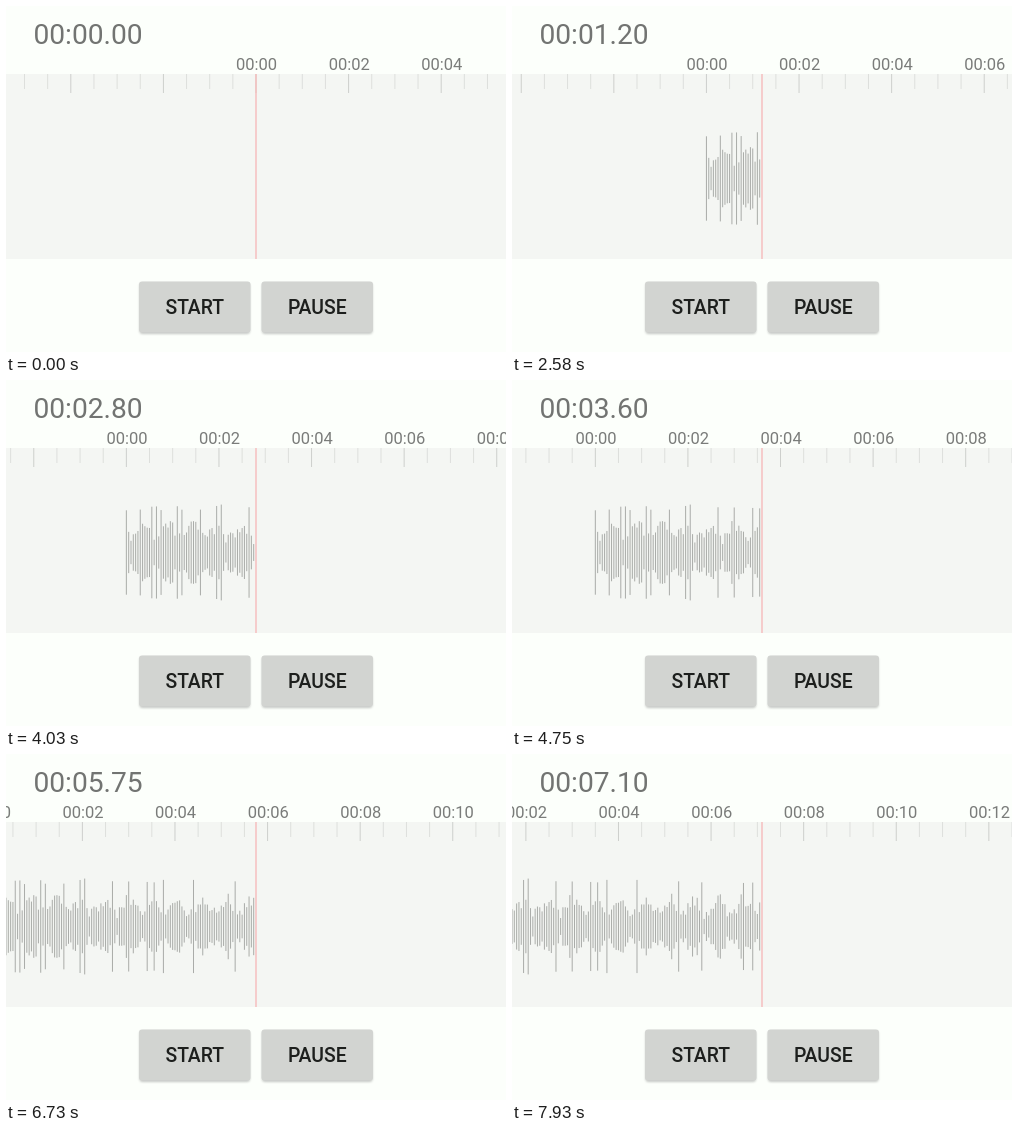
An HTML page that plays this animation: 500 px wide and 346 px high, repeating every 7990 ms.

```html
<!DOCTYPE html>
<html lang="en">
<head>
<meta charset="utf-8">
<title>Audio recorder</title>
<style>
  html, body { margin: 0; width: 100%; height: 100%; overflow: hidden; background: #fcfffb; }
  svg { display: block; width: 100%; height: 100%; font-family: Roboto, sans-serif; }
  #labels { font-size: 16.5px; fill: #7a7c7a; text-anchor: middle; }
  #buttons { font-size: 19.4px; font-weight: 500; fill: #1d1f1d; text-anchor: middle; }
</style>
</head>
<body>
<svg viewBox="0 0 500 346">
  <defs>
    <filter id="soft" x="-10%" y="-20%" width="120%" height="140%">
      <feGaussianBlur stdDeviation="1.3"/>
    </filter>
    <clipPath id="startShape"><rect x="133" y="275.5" width="111.5" height="51" rx="3"/></clipPath>
  </defs>
  <rect width="500" height="346" fill="#fcfffb"/>
  <text id="clock" x="27.4" y="38" font-size="28.2" fill="#727472"></text>
  <rect y="68" width="500" height="185" fill="#f4f6f3"/>
  <path id="minor" stroke="#dddfdc"/>
  <path id="major" stroke="#cdcfcc"/>
  <g id="labels"></g>
  <path id="wave" stroke="#a6a8a5" stroke-width=".95"/>
  <path d="M250 68V253" stroke="#f5bbba" stroke-width="1.4"/>
  <g id="buttons">
    <g fill="#000" filter="url(#soft)">
      <rect id="startShadow" x="133.5" y="277" width="110.5" height="51" rx="3" opacity=".22"/>
      <rect x="256" y="277" width="110.5" height="51" rx="3" opacity=".22"/>
    </g>
    <g fill="#d2d4d1">
      <rect x="133" y="275.5" width="111.5" height="51" rx="3"/>
      <rect x="255.5" y="275.5" width="111.5" height="51" rx="3"/>
    </g>
    <circle id="ripple" cx="189" cy="301" r="0" fill="#000" clip-path="url(#startShape)"/>
    <text x="188.8" y="308">START</text>
    <text x="311.3" y="308">PAUSE</text>
  </g>
</svg>
<script>
const LOOP = 7990, PRESS = 1360, BEGIN = 1490, RATE = 1.1;
const HEAD = 250, MID = 172.5, STEP = 0.05;
const SCALE = 500 / 10.8; // pixels per recorded second

const $ = id => document.getElementById(id);
const pad = n => String(n).padStart(2, "0");
const clamp = v => Math.min(1, Math.max(0, v));
const line = (x, top, bottom) => `M${x.toFixed(2)} ${top}V${bottom}`;

function seeded(seed) {
  return () => (seed = (seed * 16807) % 2147483647) / 2147483647;
}

// Half-heights of the bars: a steady swell with noise, and some loud beats
const beats = new Set([0, 6, 11, 13, 15, 22, 24, 32, 39, 41, 53, 60, 68, 71, 75, 88, 106, 116, 134, 138]);
const noise = seeded(4127);
const levels = Array.from({ length: 143 }, (_, i) => {
  const swell = 0.5 - 0.5 * Math.cos((i - 76) / 10.5 * 2 * Math.PI);
  const r = noise();
  return beats.has(i) ? 42 + 6 * r : 6 + 28 * (swell + r) / 2;
});

const labels = Array.from({ length: 8 }, (_, i) => {
  const el = document.createElementNS("http://www.w3.org/2000/svg", "text");
  el.setAttribute("y", 64);
  el.textContent = "00:" + pad(i * 2);
  return $("labels").appendChild(el);
});

// The screen refreshes every 60 ms, with a small shift after 3.9 s
function snap(t) {
  const shift = t >= 3910 ? 10 : 0;
  return Math.floor((t - shift) / 60) * 60 + shift;
}

// Number of bars recorded so far
function barCount(t) {
  const sec = Math.max(0, t - BEGIN) / 1000 * RATE;
  return Math.round(sec / STEP);
}

function drawRuler(now) {
  let minor = "", major = "";
  const first = Math.floor((now - 5.5) * 2), last = Math.ceil((now + 5.5) * 2);
  for (let k = first; k <= last; k++) {
    const x = HEAD + (k / 2 - now) * SCALE;
    if (k % 4) minor += line(x, 68, 83);
    else major += line(x, 68, 87);
  }
  $("minor").setAttribute("d", minor);
  $("major").setAttribute("d", major);
  labels.forEach((el, i) => el.setAttribute("x", HEAD + 0.6 + (i * 2 - now) * SCALE));
}

function drawWave(count, now) {
  let d = "";
  for (let i = 0; i < count; i++) {
    const x = HEAD + (i * STEP - now) * SCALE;
    if (x > -1) d += line(x, MID - levels[i], MID + levels[i]);
  }
  $("wave").setAttribute("d", d);
}

function drawPress(t) {
  const age = t - PRESS;
  const fade = age < 0 ? 0 : 1 - clamp((age - 250) / 350);
  const grow = 1 - (1 - clamp(age / 300)) ** 2;
  $("ripple").setAttribute("r", 62 * grow);
  $("ripple").setAttribute("opacity", 0.12 * fade);
  $("startShadow").setAttribute("y", 277 + 2 * grow * fade);
}

function draw(t) {
  const count = barCount(snap(t)), now = count * STEP;
  const cents = count * 5;
  $("clock").textContent = `00:${pad(Math.floor(cents / 100))}.${pad(cents % 100)}`;
  drawRuler(now);
  drawWave(count, now);
  drawPress(t);
}

const start = performance.now();
function tick() {
  draw((performance.now() - start) % LOOP);
  requestAnimationFrame(tick);
}
tick();
</script>
</body>
</html>
```
